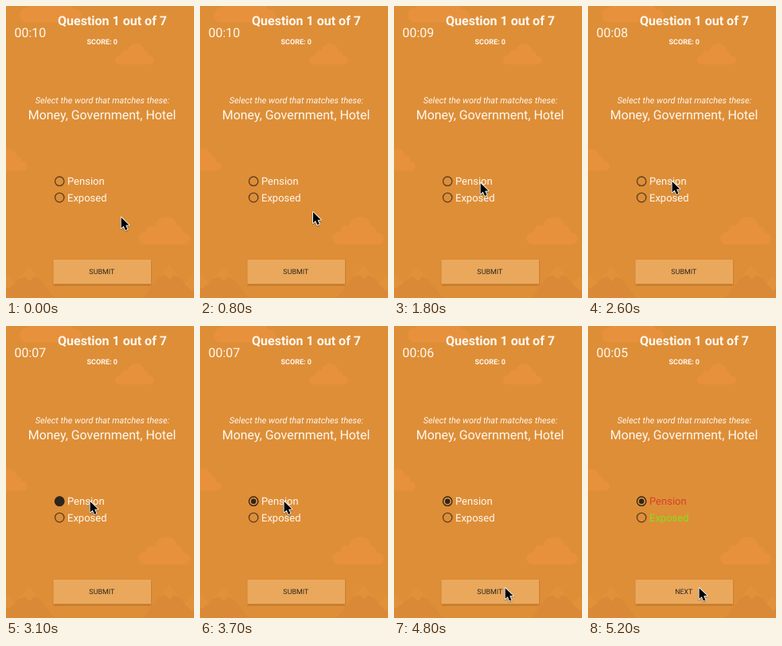
Animation of 236x366 px, one loop 5.6 s. Source, as an HTML page with a canvas:

```html
<!DOCTYPE html>
<html lang="en">
<head>
<meta charset="utf-8">
<title>Word quiz</title>
<style>
  html, body { margin: 0; width: 100%; height: 100%; overflow: hidden; background: #de8e37; }
  canvas { display: block; width: 236px; height: 366px; }
</style>
</head>
<body>
<canvas id="stage"></canvas>
<script>
const W = 236, H = 366, LOOP = 5600, STEP = 100;
const canvas = document.getElementById('stage');
const ctx = canvas.getContext('2d');
const ratio = window.devicePixelRatio || 1;
canvas.width = W * ratio;
canvas.height = H * ratio;
ctx.scale(ratio, ratio);
ctx.textRendering = 'geometricPrecision';

const COLOR = {
  sky: '#de8e37', cloud: '#e7913c', hill: '#da8a36', cap: '#e2913b',
  button: '#eaa85d', ink: '#2e251c', ring: '#5c3f20', text: '#fef8f0',
  wrong: '#d8412c', right: '#86e01c'
};

// Pointer tip: time, x, y
const POINTER_PATH = [
  [0, 144, 264], [700, 144, 264], [1000, 136, 244], [1200, 130, 234],
  [1300, 127, 232], [1500, 120, 227], [1800, 108, 221], [1900, 108, 221],
  [2000, 105, 219], [4000, 105, 219], [4300, 158, 212.5], [4400, 171, 231],
  [4500, 163, 283], [4600, 145, 319], [4700, 139, 327.5], [LOOP, 139, 327.5]
];

const clamp = v => Math.max(0, Math.min(1, v));
const mix = (a, b, k) => a + (b - a) * k;

function pointerAt(t) {
  const i = POINTER_PATH.findIndex(p => p[0] > t);
  const a = POINTER_PATH[i - 1], b = POINTER_PATH[i];
  const k = (t - a[0]) / (b[0] - a[0]);
  return [mix(a[1], b[1], k), mix(a[2], b[2], k)];
}

function label(text, x, y, size, style = '', color = COLOR.text, align = 'left') {
  ctx.font = `${style} ${size}px Roboto, sans-serif`;
  ctx.textAlign = align;
  ctx.fillStyle = color;
  ctx.fillText(text, x, y);
}

function disc(x, y, r, color) {
  ctx.fillStyle = color;
  ctx.beginPath();
  ctx.arc(x, y, r, 0, Math.PI * 2);
  ctx.fill();
}

function polygon(points, color) {
  ctx.beginPath();
  points.forEach(([x, y]) => ctx.lineTo(x, y));
  ctx.closePath();
  ctx.fillStyle = color;
  ctx.fill();
}

// Flat-bottomed cloud, 60 units wide and 32 high
function cloud(x, y, width) {
  ctx.save();
  ctx.translate(x, y);
  ctx.scale(width / 60, width / 60);
  ctx.fillStyle = COLOR.cloud;
  ctx.beginPath();
  ctx.moveTo(7, 32);
  ctx.bezierCurveTo(-3, 31, -2, 17, 9, 18);
  ctx.bezierCurveTo(9, 11, 14, 9, 19, 11);
  ctx.bezierCurveTo(22, -3, 42, -4, 45, 11);
  ctx.bezierCurveTo(50, 11, 52, 15, 51, 19);
  ctx.bezierCurveTo(62, 18, 63, 31, 53, 32);
  ctx.closePath();
  ctx.fill();
  ctx.restore();
}

// Mountain with a jagged lighter cap
function mountain(x, top) {
  const foot = H - top;
  polygon([[x, top], [x + foot * 0.8, H], [x - foot * 0.8, H]], COLOR.hill);
  polygon([[x, top], [x + 13, top + 16], [x + 6, top + 13], [x + 1, top + 19],
    [x - 5, top + 13], [x - 13, top + 16]], COLOR.cap);
}

function background() {
  ctx.fillStyle = COLOR.sky;
  ctx.fillRect(0, 0, W, H);
  cloud(17, -21, 78);
  cloud(137, 47, 49);
  cloud(-24, 179, 51);
  cloud(166, 264, 65);
  mountain(2, 336);
  mountain(29, 326);
  mountain(232, 338);
  mountain(205, 324);
}

function radio(y, chosenFor) {
  const x = 67.2;
  ctx.strokeStyle = chosenFor >= 0 ? COLOR.ink : COLOR.ring;
  ctx.lineWidth = 1.3;
  ctx.beginPath();
  ctx.arc(x, y, 5.7, 0, Math.PI * 2);
  ctx.stroke();
  if (chosenFor < 0) return;
  const grow = clamp((chosenFor + 100) / 200);
  const shrink = clamp((chosenFor - 200) / 500);
  disc(x, y, mix(6.1 * grow, 3.2, shrink), COLOR.ink);
}

function button(text, pressedFor) {
  ctx.save();
  ctx.shadowColor = 'rgba(90, 45, 0, 0.35)';
  ctx.shadowBlur = 2 * ratio;
  ctx.shadowOffsetY = ratio;
  ctx.fillStyle = COLOR.button;
  ctx.fillRect(59.5, 318, 122.5, 30.5);
  ctx.restore();
  if (pressedFor >= 0 && pressedFor < 300) {
    ctx.save();
    ctx.beginPath();
    ctx.rect(59.5, 318, 122.5, 30.5);
    ctx.clip();
    disc(139, 327, 25 + pressedFor * 0.3, 'rgba(255, 255, 255, 0.1)');
    ctx.restore();
  }
  label(text, 120.3, 336.4, 8.9, '', COLOR.ink, 'center');
}

function pointer([x, y]) {
  ctx.save();
  ctx.translate(x, y);
  ctx.lineJoin = 'round';
  ctx.strokeStyle = '#fff';
  ctx.lineWidth = 1.8;
  ctx.shadowColor = 'rgba(0, 0, 0, 0.3)';
  ctx.shadowBlur = 1.5 * ratio;
  ctx.shadowOffsetY = ratio;
  const arrow = [[0.6, 1], [0.6, 14.6], [3.7, 11.7], [6, 17], [8.5, 16], [6.2, 10.8], [10.5, 10.6]];
  polygon(arrow, '#000');
  ctx.stroke();
  ctx.shadowColor = 'transparent';
  ctx.fill();
  ctx.restore();
}

function draw(t) {
  const seconds = 10 - Math.floor((t + 100) / 1000);
  const answered = t >= 5100;
  background();
  label('Question 1 out of 7', 65, 24.3, 16, 'bold');
  label('00:' + String(seconds).padStart(2, '0'), 10.5, 38.8, 16);
  label('SCORE: 0', 120.7, 48.2, 9, 'bold', COLOR.text, 'center');
  label('Select the word that matches these:', 121, 121.8, 10.9, 'italic', COLOR.text, 'center');
  label('Money, Government, Hotel', 120.6, 141.5, 15.95, '', COLOR.text, 'center');
  radio(219.7, t - 3000);
  radio(240.1, -1);
  label('Pension', 77, 224.4, 13, '', answered ? COLOR.wrong : COLOR.text);
  label('Exposed', 77, 244.8, 13, '', answered ? COLOR.right : COLOR.text);
  button(answered ? 'NEXT' : 'SUBMIT', t - 4900);
  pointer(pointerAt(t));
}

const start = performance.now();
function tick() {
  const t = (performance.now() - start) % LOOP;
  draw(Math.floor(t / STEP) * STEP);
  requestAnimationFrame(tick);
}
tick();
</script>
</body>
</html>
```
